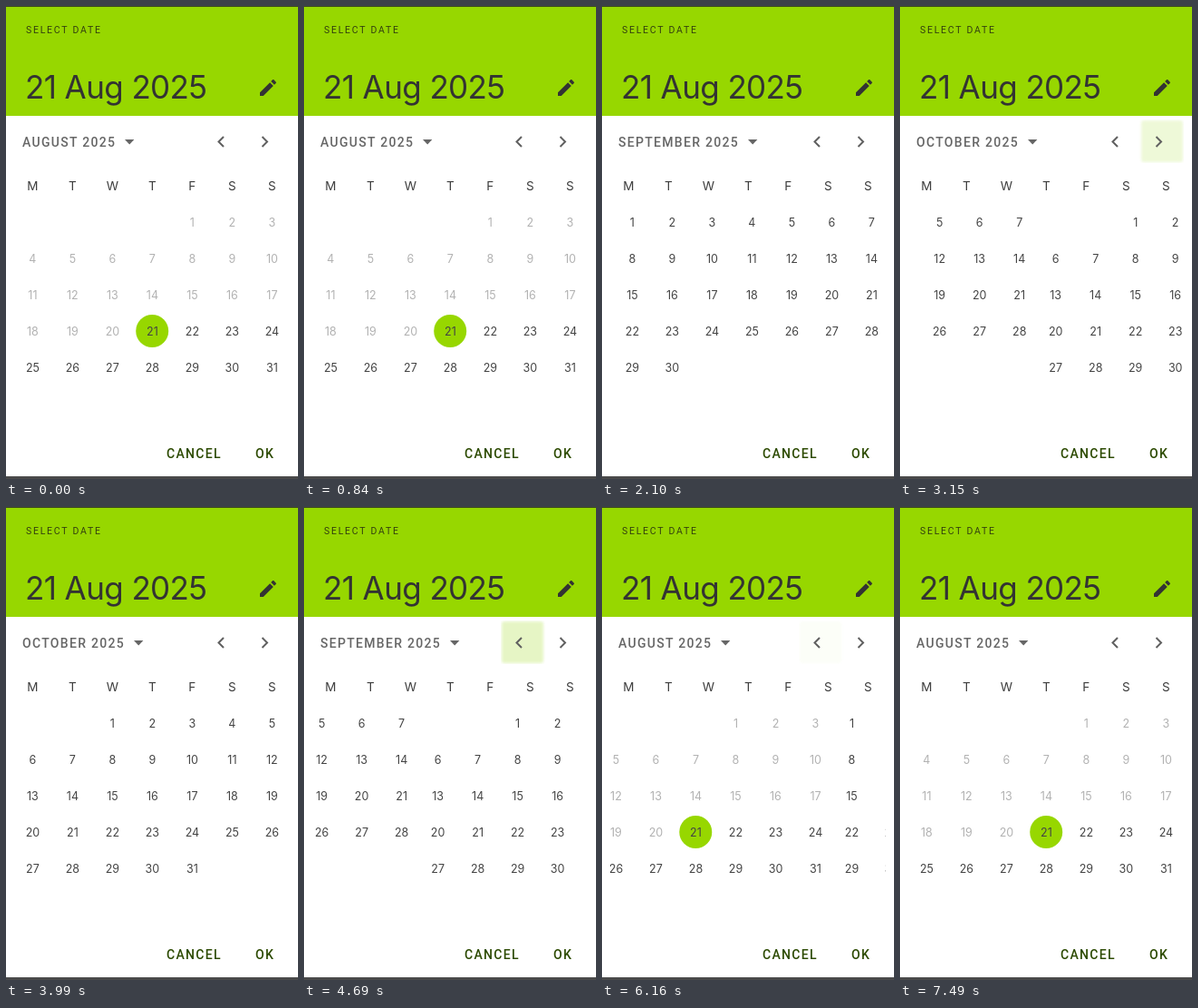
These frames come from a looping animation (322x521 px, 7560 ms). An HTML page:

```html
<!DOCTYPE html>
<html lang="en">
<head>
<meta charset="utf-8">
<title>Date picker</title>
<style>
  html, body { margin: 0; width: 100%; height: 100%; overflow: hidden; background: #fff; }
  svg { display: block; width: 100vw; height: 100vh; --t: 0; }
  text { font-family: Inter, "Open Sans", sans-serif; font-optical-sizing: none; }
  .caps { font: 500 14px Roboto, sans-serif; letter-spacing: 1.3px; }
  .over { font: 400 10.5px Roboto, sans-serif; letter-spacing: 1.75px; fill: #34400f; }
  .head { font-size: 35px; letter-spacing: -.6px; fill: #333; }
  .mid { text-anchor: middle; }
  .week { font-size: 13.5px; fill: #3c3c3c; }
  .day { font-size: 12.5px; fill: #444; }
  .past { fill: #b2b2b2; }
  .title { fill: #666; }
  .action { fill: #2c4a00; }
  .chevron { fill: none; stroke: #606060; stroke-width: 2; }
  .glow { fill: #e2f4bb; filter: blur(1.5px); opacity: 0; }

  /* The clock script moves --t; every animation is read off at that time. */
  .anim { animation: 7560ms infinite paused; animation-delay: calc(var(--t) * -1ms); }
  #pages { animation-name: slide; animation-timing-function: cubic-bezier(.3333, .6667, .6667, 1); }
  .title { animation-timing-function: step-end !important; }
  #m0 { animation-name: first; }
  #m1 { animation-name: second; }
  #m2 { animation-name: third; }
  #next { animation-name: tapNext; animation-timing-function: linear; }
  #prev { animation-name: tapPrev; animation-timing-function: linear; }

  @keyframes slide {
    0%, 16.67% { transform: translateX(0); }
    29.22%, 37.7% { transform: translateX(-304px); }
    50.26%, 60.28% { transform: translateX(-608px); }
    68.33%, 76.94% { transform: translateX(-304px); }
    85%, 100% { transform: translateX(0); }
  }
  @keyframes first {
    0%, 76.94%, 100% { opacity: 1; }
    16.67% { opacity: 0; }
  }
  @keyframes second {
    0%, 37.7%, 76.94%, 100% { opacity: 0; }
    16.67%, 60.28% { opacity: 1; }
  }
  @keyframes third {
    0%, 60.28%, 100% { opacity: 0; }
    37.7% { opacity: 1; }
  }
  @keyframes tapNext {
    0%, 14.3%, 23.4%, 35.3%, 44.4%, 100% { opacity: 0; }
    16%, 18.6%, 37%, 39.6% { opacity: 1; }
  }
  @keyframes tapPrev {
    0%, 57.4%, 65.2%, 74.1%, 81.9%, 100% { opacity: 0; }
    59%, 61.5%, 75.7%, 78.2% { opacity: 1; }
  }
</style>
</head>
<body>
<svg id="stage" viewBox="0 0 322 521" preserveAspectRatio="none">
  <defs>
    <clipPath id="grid"><rect x="9" y="214" width="304" height="210"/></clipPath>
    <clipPath id="keys"><rect x="217" y="125" width="96" height="48"/></clipPath>
  </defs>
  <rect width="322" height="521" fill="#fff"/>
  <rect width="322" height="121" fill="#97d700"/>
  <rect width="322" height="1" fill="#3d4a1c"/>
  <rect y="518" width="322" height="3" fill="#4a4a4a"/>

  <text class="over" x="22" y="29.5">SELECT DATE</text>
  <text class="head" x="21" y="102">21 Aug 2025</text>
  <path transform="translate(277 78)" fill="#333" d="M3 17.25V21h3.75L17.81 9.94l-3.75-3.75zM20.71 7.04c.39-.39.39-1.02 0-1.41l-2.34-2.34c-.39-.39-1.02-.39-1.41 0l-1.83 1.83 3.75 3.75z"/>

  <g id="titles"></g>
  <g clip-path="url(#keys)">
    <rect id="prev" class="glow anim" x="218" y="126" width="46" height="46" rx="3"/>
    <rect id="next" class="glow anim" x="266" y="126" width="46" height="46" rx="3"/>
  </g>
  <path class="chevron" d="M240 144l-5.5 5.5 5.5 5.5M282.500 144l5.500 5.500-5.500 5.500"/>

  <g id="week"></g>
  <g clip-path="url(#grid)"><g id="pages" class="anim"></g></g>

  <text class="caps action" x="177" y="497.500">CANCEL</text>
  <text class="caps action" x="275" y="497.500">OK</text>
</svg>
<script>
  const LOOP = 7560, STEP = 70, CELL = 44, ROW = 40, PAGE = 304, TODAY = 21;
  // name, weekday of the 1st, day count, right end of the title
  const months = [
    ['AUGUST', 4, 31, 120],
    ['SEPTEMBER', 0, 30, 150],
    ['OCTOBER', 2, 31, 130]
  ];
  const $ = id => document.getElementById(id);

  function add(parent, tag, attrs, content = '') {
    const el = document.createElementNS('http://www.w3.org/2000/svg', tag);
    for (const key in attrs) el.setAttribute(key, attrs[key]);
    el.textContent = content;
    return parent.appendChild(el);
  }

  [...'MTWTFSS'].forEach((letter, i) =>
    add($('week'), 'text', { class: 'mid week', x: 29.3 + i * CELL, y: 203 }, letter));

  months.forEach(([name, first, count, end], m) => {
    const title = add($('titles'), 'g', { id: 'm' + m, class: 'title anim' });
    add(title, 'text', { class: 'caps', x: 18, y: 154.7 }, name + ' 2025');
    add(title, 'path', { d: `M${end + 11} 147h10.400l-5.200 5.400z` });

    const page = add($('pages'), 'g', { transform: `translate(${m * PAGE} 0)` });
    for (let day = 1; day <= count; day++) {
      const slot = first + day - 1;
      const x = 29.4 + slot % 7 * CELL;
      const y = 238 + Math.floor(slot / 7) * ROW;
      if (!m && day === TODAY) add(page, 'circle', { cx: x - .2, cy: y, r: 18, fill: '#97d700' });
      const past = !m && day < TODAY ? ' past' : '';
      add(page, 'text', { class: 'mid day' + past, x, y: y + 4.5 }, day);
    }
  });

  function tick() {
    const t = performance.now() % LOOP;
    $('stage').style.setProperty('--t', Math.floor(t / STEP) * STEP);
    requestAnimationFrame(tick);
  }
  tick();
</script>
</body>
</html>
```
